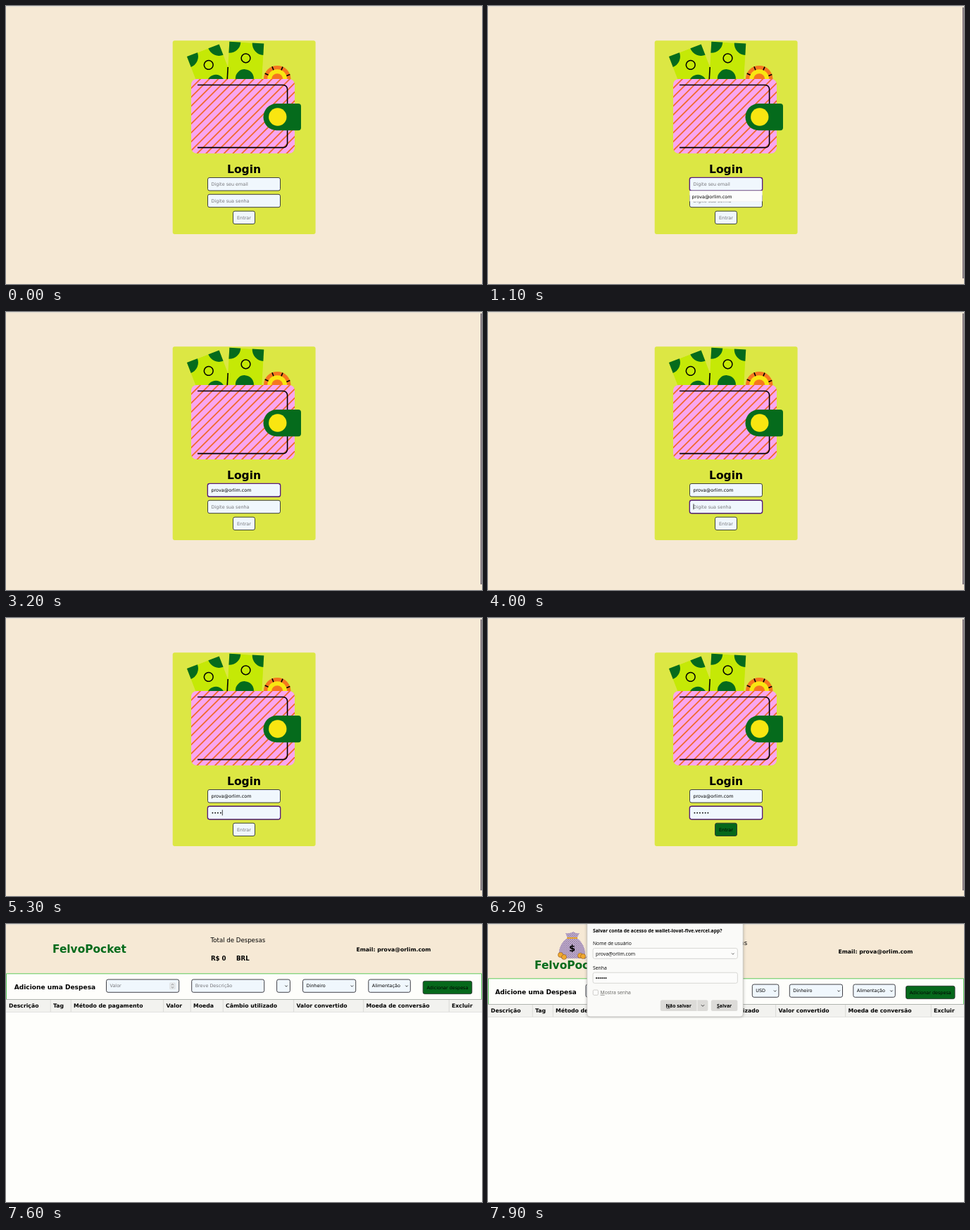
These frames come from a looping animation (676x396 px, 8 s). An HTML page with a canvas:

```html
<!DOCTYPE html>
<html lang="pt-BR">
<head>
<meta charset="utf-8">
<title>Login</title>
<style>
html, body { margin: 0; width: 100%; height: 100%; overflow: hidden; background: #f6e9d5; }
canvas { display: block; width: 676px; height: 396px; }
</style>
</head>
<body>
<canvas id="stage"></canvas>
<script>
const W = 676, H = 396, LOOP = 8000;
const EMAIL = 'prova@orlim.com', BRAND = 'FelvoPocket';
const CREAM = '#f6e9d5', LIME = '#dce744', GREEN = '#056b1c', BILL = '#c5e906';
const ORANGE = '#f5761f', YELLOW = '#f9e611', FIELD = '#f0f7fd', GRAY = '#757579';
const SANS = '"DejaVu Sans", sans-serif', UI = '"Open Sans", sans-serif';
const SMALL = 6.45, BASE = 7.75;

const canvas = document.getElementById('stage');
const ctx = canvas.getContext('2d');
const ratio = window.devicePixelRatio || 1;
canvas.width = W * ratio;
canvas.height = H * ratio;

function rect(x, y, w, h, fill) {
  ctx.fillStyle = fill;
  ctx.fillRect(x, y, w, h);
}

function box(x1, y1, x2, y2, r, fill, stroke, width = 0.9) {
  ctx.beginPath();
  ctx.roundRect(x1, y1, x2 - x1, y2 - y1, r);
  if (fill) { ctx.fillStyle = fill; ctx.fill(); }
  if (stroke) { ctx.strokeStyle = stroke; ctx.lineWidth = width; ctx.stroke(); }
}

function disc(x, y, r, fill) {
  ctx.beginPath();
  ctx.arc(x, y, r, 0, 7);
  ctx.fillStyle = fill;
  ctx.fill();
}

function line(points, color, width) {
  ctx.beginPath();
  points.forEach(([x, y]) => ctx.lineTo(x, y));
  ctx.strokeStyle = color;
  ctx.lineWidth = width;
  ctx.stroke();
}

function text(s, x, y, size = SMALL, { color = '#000', bold = false, font = SANS, align = 'left' } = {}) {
  ctx.font = `${bold ? 'bold ' : ''}${size}px ${font}`;
  ctx.fillStyle = color;
  ctx.textAlign = align;
  ctx.fillText(s, x, y);
}

function chevron(x, y, size = 1.7, color = '#222') {
  line([[x - size, y - size / 2], [x, y + size / 2], [x + size, y - size / 2]], color, 0.9);
}

// ---- Login screen ----

function bill(x, y, angle) {
  ctx.save();
  ctx.translate(x, y);
  ctx.rotate(angle * Math.PI / 180);
  ctx.beginPath();
  ctx.rect(-24.5, 0, 49, 75);
  ctx.clip();
  rect(-25, 0, 50, 75, BILL);
  disc(-24.5, 0, 16, GREEN);
  disc(24.5, 0, 16.5, GREEN);
  disc(0, 51, 13, GREEN);
  ctx.beginPath();
  ctx.arc(0, 22.2, 6.4, 0, 7);
  ctx.strokeStyle = '#000';
  ctx.lineWidth = 1.5;
  ctx.stroke();
  ctx.restore();
}

function coin(x, y) {
  disc(x, y, 19.3, ORANGE);
  disc(x, y, 14, YELLOW);
  disc(x, y, 8, ORANGE);
  for (const deg of [-155, -112, -66, -20]) {
    const a = deg * Math.PI / 180, c = Math.cos(a), s = Math.sin(a);
    line([[x + 14 * c, y + 14 * s], [x + 19.3 * c, y + 19.3 * s]], '#000', 1.6);
  }
}

function wallet() {
  ctx.save();
  ctx.beginPath();
  ctx.rect(237, 49, 203, 56);
  ctx.clip();
  bill(279.8, 63.2, -21);
  bill(341.8, 52.2, 3.3);
  line([[315.2, 87], [314.2, 105]], '#000', 1.6);
  coin(385.2, 104.2);
  ctx.restore();

  ctx.save();
  ctx.beginPath();
  ctx.roundRect(263, 104, 147, 106, 8);
  ctx.clip();
  rect(263, 104, 147, 106, '#f9a6ef');
  for (let x = 276; x < 530; x += 12.7) line([[x + 2, 102], [x - 108, 212]], '#f2692c', 1.8);
  ctx.restore();

  ctx.beginPath();
  ctx.moveTo(272, 112.5);
  ctx.arcTo(399.6, 112.5, 399.6, 120, 6);
  ctx.arcTo(399.6, 201.6, 390, 201.6, 6);
  ctx.lineTo(272, 201.6);
  ctx.strokeStyle = '#000';
  ctx.lineWidth = 1.6;
  ctx.stroke();
  box(365.5, 139, 419, 177.3, [19, 4, 4, 19], GREEN);
  disc(385.8, 158, 12.7, YELLOW);
}

function input(x1, y1, x2, y2, value, placeholder, focused) {
  box(x1, y1, x2, y2, 2.5, FIELD, '#2c2c33');
  if (focused) box(x1 - 0.2, y1 - 0.2, x2 + 0.2, y2 + 0.2, 2.8, null, '#5a1c83', 1.3);
  text(value || placeholder, x1 + 5, (y1 + y2) / 2 + 2.3, SMALL, { color: value ? '#000' : GRAY });
}

function button(x1, y1, x2, y2, label, fill, color) {
  box(x1, y1, x2, y2, 2.5, fill, '#2c352f');
  text(label, (x1 + x2) / 2, (y1 + y2) / 2 + 2.3, SMALL, { color, align: 'center' });
}

function suggestions(active) {
  box(286.6, 263.2, 389.4, 278.6, 1, '#fcfcfb', '#ecebe8', 0.5);
  if (active) rect(287, 265.6, 102, 11, '#d6d5d0');
  text(EMAIL, 289.6, 273.6);
}

const KEYS = [4500, 4800, 5000, 5300, 5600, 5900];

function login(t) {
  rect(0, 0, W, H, CREAM);
  rect(0, 0, W, 1.3, '#e2ded4');
  if (t >= 100) rect(674, 2, 1.5, 386, '#5b5464');
  box(236.7, 49.3, 439.6, 324.9, 3, LIME);
  wallet();
  text('Login', 338, 238, 15.5, { bold: true, align: 'center' });

  const filled = t >= 2300;
  const typed = KEYS.filter(k => t >= k).length;
  const onEmail = t >= 1000 && t < 3800;
  const onPass = t >= 3800 && t < 7400;
  input(286.5, 244.5, 389.5, 263, filled ? EMAIL : '', 'Digite seu email', onEmail);
  input(286.5, 268.3, 389.5, 286.7, '•'.repeat(typed), 'Digite sua senha', onPass);
  if (onPass && t < 6100) rect(291.6 + typed * 3.81, 273.3, 0.8, 8, '#111');

  if (typed < 6) button(322.5, 292.2, 353.5, 310.5, 'Entrar', FIELD, GRAY);
  else button(322.5, 292.2, 353.5, 310.5, 'Entrar', t < 7100 ? '#06681b' : '#c8e114', '#000');
  if (t >= 1100 && t < 2300) suggestions(t >= 1300);
}

// ---- Expenses screen ----

function moneyBag() {
  ctx.beginPath();
  ctx.moveTo(113, 20);
  ctx.bezierCurveTo(99, 28, 98, 49, 106, 49);
  ctx.lineTo(134, 49);
  ctx.bezierCurveTo(141, 49, 139, 28, 126, 20);
  ctx.lineTo(130, 13);
  ctx.quadraticCurveTo(125, 14, 121, 11);
  ctx.quadraticCurveTo(116, 14, 110, 13);
  ctx.closePath();
  ctx.save();
  ctx.clip();
  rect(97, 10, 45, 41, '#c4b0d2');
  for (let x = 60; x < 180; x += 3) {
    line([[x, 10], [x + 40, 50]], '#8e7a9e', 0.6);
    line([[x, 10], [x - 40, 50]], '#8e7a9e', 0.6);
  }
  ctx.restore();
  ctx.strokeStyle = '#75638a';
  ctx.lineWidth = 0.8;
  ctx.stroke();
  line([[112, 20], [127, 20]], '#e9a52a', 2);
  text('$', 119.5, 39, 13, { bold: true, align: 'center' });
  for (const [x, y] of [[103, 44], [108, 47], [131, 45], [135, 46]]) {
    disc(x, y, 3.8, '#a86f2b');
    disc(x, y, 3, '#f0a92f');
  }
}

function select(x1, x2, y, label) {
  box(x1, y, x2, y + 18.3, 2.5, FIELD, '#2c2c33');
  text(label, x1 + 5, y + 11.4);
  chevron(x2 - 5.3, y + 9.4);
}

const COLUMNS = [
  ['Descrição', 4], ['Tag', 67], ['Método de pagamento', 96], ['Valor', 227.5], ['Moeda', 266],
  ['Câmbio utilizado', 312], ['Valor convertido', 412.5], ['Moeda de conversão', 511.5], ['Excluir', 633]
];

function expenses(t) {
  const loaded = t >= 7700, bag = t >= 7800;
  const dy = bag ? 7 : 0;
  const bold = { bold: true };
  rect(0, 0, W, H, '#fefefb');
  rect(0, 0, W, 71 + dy, CREAM);
  rect(0, 0, W, 1.3, '#e2ded4');
  if (bag) moneyBag();
  text(BRAND, 66, bag ? 64 : 41.3, 15.4, { bold: true, color: GREEN });
  text('Total de Despesas', 290.5, 26 + dy / 2, 8.6);
  text('R$ 0', 291, 51.5 + dy / 2, 8.6, bold);
  text('BRL', 327, 51.5 + dy / 2, 8.6, bold);
  text('Email: ' + EMAIL, 497.5, 38.8 + dy / 2, BASE, bold);

  ctx.save();
  ctx.translate(0, dy);
  box(0.5, 70.8, 675.5, 107.5, 0, '#fefefb', '#4cc44c');
  const [title, value, desc, coinX, pay, tag, add] = loaded
    ? [10.2, 139, 257, 375.3, 428.3, 518.8, 593.5]
    : [11.7, 142.5, 263.7, 384.6, 421.5, 514.8, 592.2];
  text('Adicione uma Despesa', title, 92.5, 9.07, bold);
  input(value, 79, value + 103.2, 97.3, '', 'Valor');
  box(value + 89.5, 83.2, value + 98.5, 93.2, 1.5, '#e3e6e8');
  line([[value + 92.4, 87], [value + 94, 85.5], [value + 95.6, 87]], '#777', 0.8);
  line([[value + 92.4, 89.5], [value + 94, 91], [value + 95.6, 89.5]], '#777', 0.8);
  input(desc, 79, desc + 103, 97.3, '', 'Breve Descrição');
  select(coinX, coinX + (loaded ? 37.6 : 18.8), 79, loaded ? 'USD' : '');
  select(pay, pay + 75.2, 79, 'Dinheiro');
  select(tag, tag + 59.5, 79, 'Alimentação');
  button(add, 81.3, add + 69.5, 99.6, 'Adicionar despesa', '#06681b', '#000');

  rect(0, 107.5, W, 18, '#f2f2ef');
  rect(0, 107, W, 1, '#b0b4ae');
  rect(0, 125, W, 0.8, '#dededb');
  COLUMNS.forEach(([label, x], i) => {
    if (i) rect(x - 4.2, 108, 0.8, 17, '#d4d4d1');
    text(label, x, 119.3, BASE, bold);
  });
  ctx.restore();
  if (t >= 7900) saveDialog();
}

function saveDialog() {
  const ui = { font: UI }, strong = { font: UI, bold: true }, size = 6.8;
  ctx.save();
  ctx.shadowColor = 'rgba(0,0,0,.35)';
  ctx.shadowBlur = 4;
  box(140.8, -6, 362.2, 132, 4, '#fafaf8');
  ctx.restore();
  box(140.8, -6, 362.2, 132, 4, null, '#c9c8c4', 0.7);
  text('Salvar conta de acesso de wallet-lovat-five.vercel.app?', 149, 12.4, size, strong);
  text('Nome de usuário', 149, 30.4, size, ui);
  box(149, 34.6, 354.4, 49.4, 2.5, '#fcfcfb', '#cfcecb', 0.8);
  text(EMAIL, 153, 44.6, size, ui);
  chevron(347.8, 42.4, 1.8, '#555');
  text('Senha', 149, 65.2, size, ui);
  box(149, 69.2, 354.4, 84.3, 2.5, '#fcfcfb', '#cfcecb', 0.8);
  for (let i = 0; i < 6; i++) disc(154 + i * 2.7, 77, 1.05, '#111');
  box(149.2, 94, 156.4, 101.3, 1.5, '#fcfcfb', '#c2c1be', 0.8);
  text('Mostra senha', 159.6, 100, size, { font: UI, color: '#62625f' });
  rect(159.6, 100.9, 6, 0.6, '#62625f');
  box(244.8, 108.2, 296.6, 124, [2.5, 0, 0, 2.5], '#dcdbd8');
  box(297.4, 108.2, 312.4, 124, [0, 2.5, 2.5, 0], '#dcdbd8');
  box(316.8, 108.2, 354.4, 124, 2.5, '#dcdbd8');
  text('Não salvar', 270.7, 118.6, size, { ...strong, align: 'center' });
  text('Salvar', 335.6, 118.6, size, { ...strong, align: 'center' });
  rect(253.4, 119.6, 5, 0.7, '#111');
  rect(325.2, 119.6, 3.6, 0.7, '#111');
  chevron(305, 116.2, 2.2, '#333');
}

const start = performance.now();

function draw() {
  const t = (performance.now() - start) % LOOP;
  ctx.setTransform(ratio, 0, 0, ratio, 0, 0);
  if (t < 7600) login(t);
  else expenses(t);
  requestAnimationFrame(draw);
}
draw();
</script>
</body>
</html>
```
